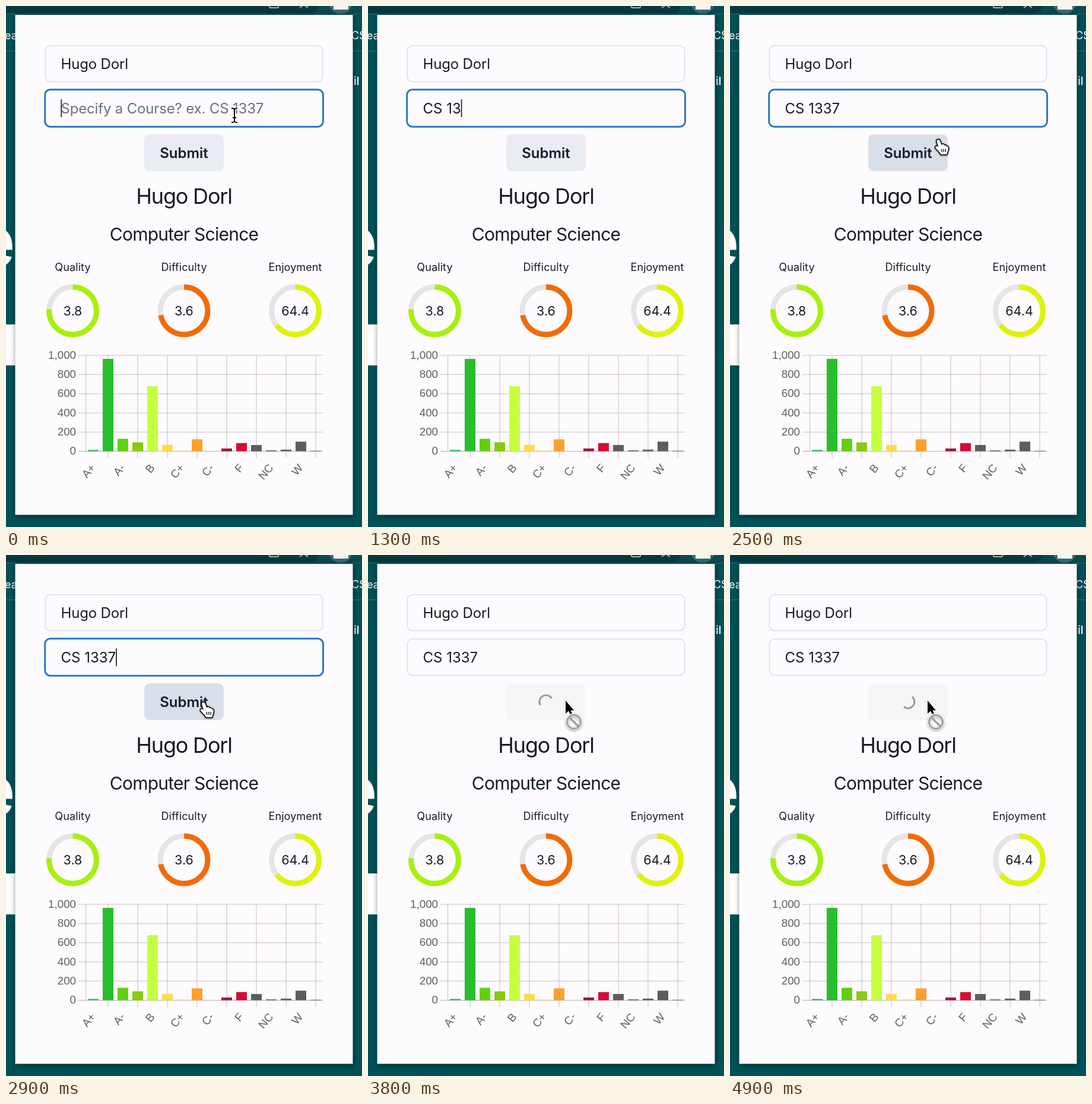
Recreate the animation shown at these times as an HTML page with a canvas. Size 600 by 877 pixels, loop 5 s.

```html
<!DOCTYPE html>
<html lang="en">
<head>
<meta charset="utf-8">
<title>Course lookup</title>
<style>
html, body { margin: 0; width: 600px; height: 877px; overflow: hidden; background: #005157; }
canvas { display: block; }
</style>
</head>
<body>
<canvas id="stage" width="600" height="877"></canvas>
<script>
const c = document.getElementById('stage').getContext('2d');
const LOOP = 5000;
const NAME = 'Hugo Dorl', COURSE = 'CS 1337';
const INK = '#171c26';
const SANS = 'Inter, "Open Sans", sans-serif';
const CHART = '"Liberation Sans", Arial, sans-serif';
const KEY_TIMES = [300, 600, 900, 1100, 1300, 1500, 1800];
const CLICK = 3100;

function text(s, x, y, size, { color = INK, align = 'left', weight = 400, gap = 0, family = SANS, base = 'alphabetic' } = {}) {
  c.font = `${weight} ${size}px ${family}`;
  c.letterSpacing = gap + 'px';
  c.textAlign = align;
  c.textBaseline = base;
  c.fillStyle = color;
  c.fillText(s, x, y);
}

function rect(x, y, w, h, color) {
  c.fillStyle = color;
  c.fillRect(x, y, w, h);
}

function box(x, y, w, h, r, fill, stroke, line = 1.5) {
  c.beginPath();
  c.roundRect(x, y, w, h, r);
  if (fill) { c.fillStyle = fill; c.fill(); }
  if (stroke) { c.strokeStyle = stroke; c.lineWidth = line; c.stroke(); }
}

function arc(x, y, r, from, to, color, line) {
  c.beginPath();
  c.arc(x, y, r, from, to);
  c.strokeStyle = color;
  c.lineWidth = line;
  c.stroke();
}

function drawPage() {
  rect(0, 0, 600, 877, '#005157');
  rect(0, 0, 600, 13, '#0a4a50');
  box(-20, -30, 547, 42, 14, '#063a40');
  box(444, -12, 15, 15, 2, null, '#9fb3b5', 2);
  c.beginPath();
  c.moveTo(495, 3); c.lineTo(502, -2); c.lineTo(509, 3);
  c.strokeStyle = '#9fb3b5';
  c.stroke();
  c.beginPath();
  c.arc(564, -7, 20, 0, 7);
  c.fillStyle = '#3b6c71';
  c.fill();
  rect(552, -18, 25, 24, '#f4f4f4');
  rect(0, 13, 600, 1, '#26686d');
  rect(0, 75, 600, 1, '#3a777b');
  text('ea', -2, 56, 18, { color: '#fff' });
  text('CS', 582, 56, 18, { color: '#fff' });
  text('il', 586, 133, 19, { color: '#fff', weight: 500 });
  text('e', -59, 440, 125, { color: '#fff', weight: 700 });
  rect(0, 536, 16, 69, '#fff');
  c.save();
  c.shadowColor = 'rgba(0,0,0,.55)';
  c.shadowBlur = 9;
  c.shadowOffsetY = 1;
  rect(15.5, 15, 569, 841.5, '#fdfbfe');
  c.restore();
}

function drawRing(x, label, value, part, color) {
  const top = -Math.PI / 2;
  text(label, x, 446, 18, { align: 'center', gap: .1 });
  arc(x, 513, 40, 0, 2 * Math.PI, '#e6e4e4', 9);
  arc(x, 513, 40, top, top + part * 2 * Math.PI, color, 9);
  text(value, x, 521, 21.5, { align: 'center' });
}

const BARS = [
  [14, '#32be5c', 'A+'], [963, '#29be2c'], [130, '#63d00f', 'A-'], [93, '#87cb0c'],
  [678, '#c4ff3f', 'B'], [66, '#ffdb4a'], [8, '#fbe27a', 'C+'], [124, '#ff9f2e'],
  [2, '#e8c4b0', 'C-'], [29, '#981c43'], [85, '#d60a35', 'F'], [65, '#5d5c5f'],
  [9, '#5d5c5f', 'NC'], [17, '#5d5c5f'], [100, '#5d5c5f', 'W'], [5, '#5d5c5f']
];

function drawChart() {
  const zero = 749.5, unit = .1615;
  const grid = 'rgba(60,50,50,.22)';
  for (let v = 0; v <= 1000; v += 200) {
    const y = zero - v * unit;
    rect(122, y - .6, 412, 1.3, v ? grid : 'rgba(60,50,50,.32)');
    text(v.toLocaleString('en-US'), 118, y + .5, 18.75, { color: '#5f5e62', align: 'right', family: CHART, base: 'middle' });
  }
  rect(133.9, 588, 1.3, 161, grid);
  for (let x = 172; x < 534; x += 50) rect(x - .6, 588, 1.3, 173, grid);
  BARS.forEach(([v, color, label], i) => {
    const x = 147 + i * 25;
    rect(x - 9, zero - v * unit, 18, v * unit, color);
    if (!label) return;
    c.save();
    c.translate(x + .5, 774.5);
    c.rotate(-50 * Math.PI / 180);
    text(label, 0, 0, 18.75, { color: '#5f5e62', align: 'right', family: CHART, base: 'middle' });
    c.restore();
  });
}

function drawForm(t) {
  const busy = t >= CLICK;
  const count = KEY_TIMES.filter(k => t >= k).length;
  const typed = COURSE.slice(0, count);
  box(66.25, 66.75, 467.5, 60.75, 9, null, '#d8e0e6');
  text(NAME, 92.5, 106, 24, { gap: -.17 });

  if (busy) box(66.25, 141.5, 467.5, 61, 9, null, '#d8e0e6');
  else box(65.7, 140.7, 468.8, 62.6, 9, null, '#2d76c4', 3);
  if (count) text(typed, 92.5, 181, 24);
  else text('Specify a Course? ex. CS 1337', 92.5, 181, 24, { color: '#66727f', gap: -.17 });
  const since = t - (count ? KEY_TIMES[count - 1] : 0);
  if (!busy && since % 1000 < 500) {
    c.font = `24px ${SANS}`;
    c.letterSpacing = '0px';
    rect(92.5 + c.measureText(typed).width, 157, 1.6, 30, '#111');
  }

  const hover = pointer(t).y >= 216;
  box(233, 216, 134, 62, 9, busy ? '#f5f6f8' : hover ? '#d9dfe9' : '#e9edf3');
  if (busy) {
    const start = (110 + (t - 3300) / 450 * 360) * Math.PI / 180;
    arc(300, 247, 11, start, start + Math.PI, '#9b9b9e', 3);
  } else text('Submit', 300, 256, 24, { align: 'center', weight: 600 });
}

// The pointer hides while typing, then glides to the button.
function pointer(t) {
  const p = Math.min(1, Math.max(0, (t - 2200) / 500));
  const e = p * p * (3 - 2 * p);
  return { x: 385 - 52 * e, y: 184 + 66 * e, shown: t < 300 || t >= 2200 };
}

function shape(d, fill, stroke, line) {
  const p = new Path2D(d);
  c.lineJoin = 'round';
  if (stroke) { c.strokeStyle = stroke; c.lineWidth = line; c.stroke(p); }
  if (fill) { c.fillStyle = fill; c.fill(p); }
}

function drawPointer(t) {
  const { x, y, shown } = pointer(t);
  if (!shown) return;
  c.save();
  c.translate(x, y);
  const arrow = 'M0 -5V17L5 12.5L9 20.5L12 19L8.5 11.5H14Z';
  if (t >= CLICK) {
    shape(arrow, '#000', '#fff', 3);
    c.save();
    c.shadowColor = 'rgba(0,0,0,.4)';
    c.shadowBlur = 3;
    c.shadowOffsetY = 1;
    arc(14, 31, 11.5, 0, 7, '#fff', 6);
    c.restore();
    arc(14, 31, 11.5, 0, 7, '#a3a2a4', 3.5);
    shape('M6 23L22 39', null, '#a3a2a4', 3.5);
  } else if (y >= 216) {
    c.shadowColor = 'rgba(0,0,0,.4)';
    c.shadowBlur = 3;
    c.shadowOffsetY = 1;
    shape('M-3 1C-3 -3 2 -3 3 1L5 7C7 5 10 6 10 8C12 7 14 8 14 10C17 9 17 12 16.5 15L14 23H4C2 18 -2 16 -5 12C-6 9 -2 8 0 11Z', '#fff', '#000', 3);
    c.shadowColor = 'transparent';
    shape('M5.5 14V19M8.8 14V19M12 14V19', null, '#000', 1.3);
  } else if (y > 204) {
    shape(arrow, '#000', '#fff', 3);
  } else {
    const beam = 'M-5 -12Q0 -12 0 -9Q0 -12 5 -12M0 -9V9M-5 12Q0 12 0 9Q0 12 5 12M-3 4H3';
    shape(beam, null, '#fff', 4.5);
    shape(beam, null, '#000', 2);
  }
  c.restore();
}

function draw(now) {
  const t = Math.floor(now % LOOP / 100) * 100;
  drawPage();
  drawForm(t);
  text(NAME, 300, 333, 36, { align: 'center', gap: -1.2 });
  text('Computer Science', 300, 395, 30, { align: 'center', gap: -.75 });
  drawRing(112.5, 'Quality', '3.8', .76, '#a6f10a');
  drawRing(300, 'Difficulty', '3.6', .72, '#f26b08');
  drawRing(487.5, 'Enjoyment', '64.4', .644, '#dff207');
  drawChart();
  drawPointer(t);
  requestAnimationFrame(draw);
}
draw(performance.now());
</script>
</body>
</html>
```
